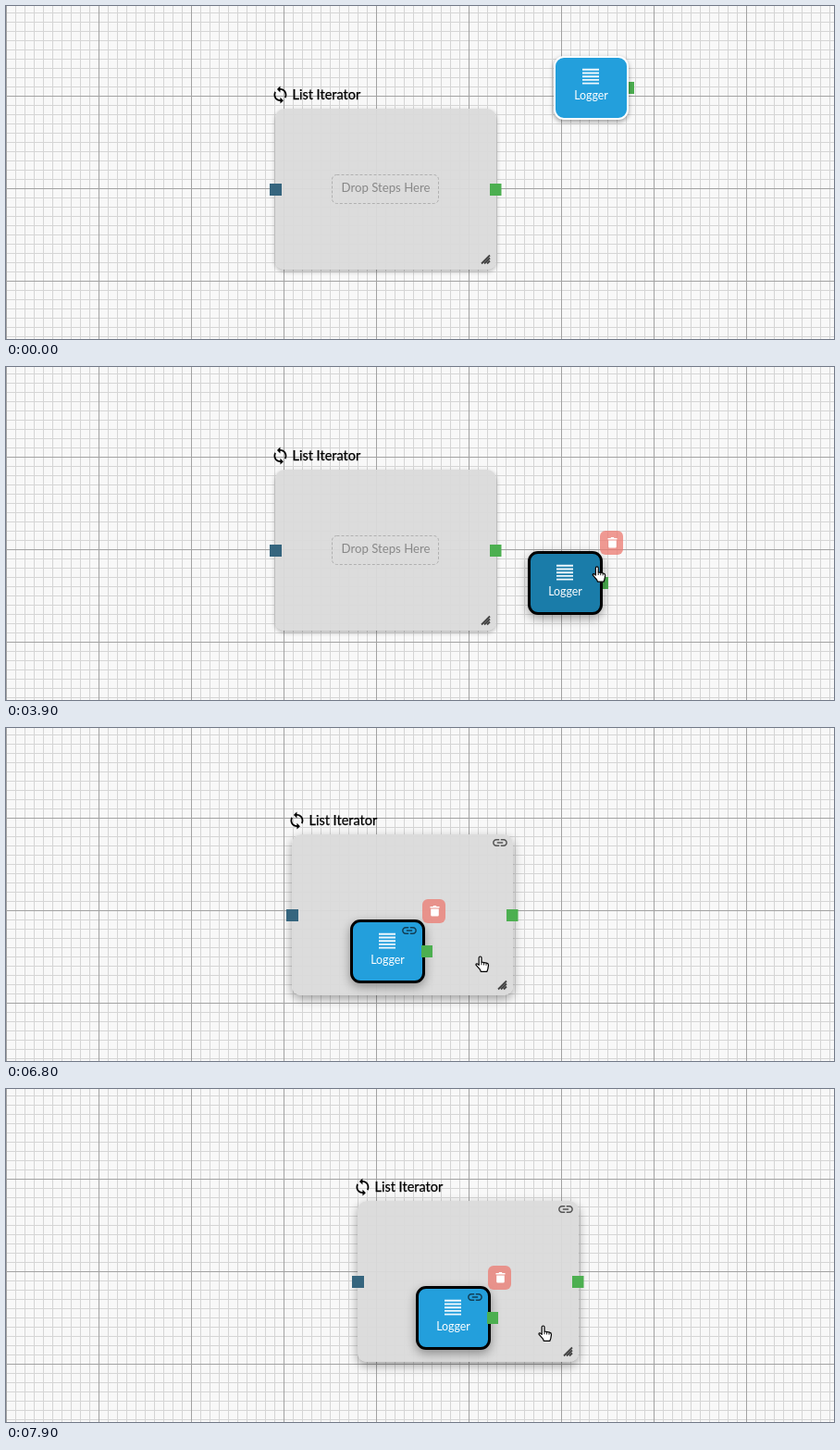
Animation of 895x360 px, one loop 8 s. Source, as an HTML page:

```html
<!DOCTYPE html>
<html lang="en">
<head>
<meta charset="utf-8">
<title>Drag a step into a list iterator</title>
<style>
html, body { margin: 0; width: 100%; height: 100%; overflow: hidden; }
body {
  position: relative;
  font-family: Lato, "Noto Sans", sans-serif;
  --major: #a2a2a2;
  --minor: #d5d5d5;
  background:
    linear-gradient(90deg, var(--major) 1px, transparent 1px) 0 0 / 100px 100px,
    linear-gradient(var(--major) 1px, transparent 1px) 0 97px / 100px 100px,
    linear-gradient(90deg, var(--minor) 1px, transparent 1px) 0 0 / 10px 10px,
    linear-gradient(var(--minor) 1px, transparent 1px) 0 7px / 10px 10px,
    #f8f8f8;
}
div, svg { position: absolute; box-sizing: border-box; }
svg { left: 0; top: 0; overflow: visible; }
#group, #card { left: 0; top: 0; }

.panel {
  left: 291px; top: 111px; width: 239px; height: 174px;
  border-radius: 10px;
  background: rgba(219, 219, 219, .95);
  box-shadow: 0 2px 5px rgba(0, 0, 0, .28);
}
.docked .panel { box-shadow: 0 4px 11px rgba(0, 0, 0, .36); }
.outline {
  left: 288px; top: 108px; width: 245px; height: 181px;
  border: 3px dashed #35657e; border-radius: 13px;
  visibility: hidden;
}
.over .outline { visibility: visible; }

.tile {
  z-index: 1;
  width: 81px; height: 69px;
  border: 2.5px solid #fff; border-radius: 11px;
  background: #239fdc;
  box-shadow: 0 2px 5px rgba(0, 0, 0, .38);
}
.hover .tile { background: #1a7ca9; }
.picked .tile { border: 3px solid #000; box-shadow: 0 4px 11px rgba(0, 0, 0, .36); }
.face { z-index: 2; }
.picked .face { transform: translateY(1px); }
.port { left: 74.5px; top: 28px; width: 12.5px; height: 12.5px; background: #4caf50; }
.docked .port { left: 76.5px; z-index: 3; }
.bin {
  z-index: 4;
  left: 77.5px; top: -22px; width: 25.5px; height: 26px;
  border-radius: 6px;
  background: rgba(236, 124, 114, .77);
  visibility: hidden;
}
.picked .bin { visibility: visible; }

.link { visibility: hidden; }
.linked .link { visibility: visible; }
.linked .drop { visibility: hidden; }
#cursor g { display: none; }
#cursor.move .cross, #cursor.hand .finger { display: inline; }
</style>
</head>
<body>
<svg width="0" height="0">
  <defs>
    <path id="chain" d="M3.9 12c0-1.71 1.39-3.1 3.1-3.1h4V7H7c-2.76 0-5 2.24-5 5s2.24 5 5 5h4v-1.9H7c-1.71 0-3.1-1.39-3.1-3.1zM8 13h8v-2H8v2zm9-6h-4v1.9h4c1.71 0 3.1 1.39 3.1 3.1s-1.39 3.1-3.1 3.1h-4V17h4c2.76 0 5-2.24 5-5s-2.24-5-5-5z"/>
  </defs>
</svg>

<div id="group">
  <div class="panel"></div>
  <div class="outline"></div>
  <svg width="895" height="360">
    <path transform="translate(286 85.6) scale(.87)" d="M12 4V1L8 5l4 4V6c3.31 0 6 2.69 6 6 0 1.01-.25 1.97-.7 2.8l1.46 1.46C19.54 15.03 20 13.57 20 12c0-4.42-3.58-8-8-8zm0 14c-3.31 0-6-2.69-6-6 0-1.01.25-1.97.7-2.8L5.24 7.74C4.46 8.97 4 10.43 4 12c0 4.42 3.58 8 8 8v3l4-4-4-4v3z"/>
    <text x="309.5" y="101" font-size="14.5" stroke="#000" stroke-width=".25">List Iterator</text>
    <g class="drop">
      <rect x="352.5" y="182.5" width="115" height="31" rx="5" fill="none" stroke="#b0b0b0" stroke-dasharray="3 2"/>
      <text x="410.5" y="201" font-size="13.2" text-anchor="middle" fill="#888">Drop Steps Here</text>
    </g>
    <path d="M514 278.5l9-9M517 278.5l6-6M520 278.5l3-3" stroke="#444" stroke-width="1.8"/>
    <use class="link" href="#chain" transform="translate(506.5 110.5) scale(.79)" fill="#555"/>
    <rect x="285" y="192" width="13" height="13" fill="#35657e"/>
    <rect x="523" y="192" width="12.5" height="13" fill="#4caf50"/>
  </svg>
</div>

<div id="card">
  <div class="port"></div>
  <div class="tile"></div>
  <svg class="face" width="81" height="69">
    <path d="M31 15h18M31 18.7h18M31 22.4h18M31 26.1h18M31 29.8h18" transform="translate(0 -.2)" stroke="#eef8fd" stroke-width="1.9"/>
    <text x="40.5" y="47" font-size="12.4" text-anchor="middle" fill="#fff">Logger</text>
    <use class="link" href="#chain" transform="translate(54.5 1.5) scale(.79)" fill="#123f57"/>
  </svg>
  <div class="bin">
    <svg width="26" height="26">
      <path d="M8.5 8h3l.6-1h2.8l.6 1h3v1.6h-10zM9.2 10.4h8.6v6.8q0 1.3-1.3 1.3h-6q-1.3 0-1.3-1.3z" fill="#fff"/>
    </svg>
  </div>
</div>

<svg id="cursor" width="20" height="20">
  <g class="cross">
    <path d="M0-9.5l3.6 4H1v4.500h4.500v-2.600l4 3.600-4 3.600V1H1v4.500h2.600L0 9.500l-3.600-4H-1V1h-4.500v2.600l-4-3.600 4-3.600V-1H-1v-4.500h-2.600z" stroke="#fff" stroke-width="1.4" paint-order="stroke"/>
  </g>
  <g class="finger" transform="translate(-5 -1)">
    <path d="M4.2 2.4a1.4 1.4 0 0 1 2.8 0V7l5.6 1.2q2 .5 1.9 2.4l-.6 3.600-1 3.200H6.400L5.400 15.200 1.200 10.400q-.6-1.300.7-1.600 1-.1 2.300 1.500z" fill="#fff" stroke="#000" stroke-width="1.2" stroke-linejoin="round"/>
    <path d="M7 7v3.200M9.500 7.700v2.700M12 8.200v2.500" stroke="#000" stroke-width=".9"/>
  </g>
</svg>

<script>
const LOOP = 8000, STEP = 100;
const HOME = [592, 54];

// Waypoints: [step, x, y]
const cardPath = [
  [35, ...HOME], [36, 600, 62], [37, 603, 85], [38, 597, 141], [39, 564, 199],
  [40, 530, 222], [41, 494, 231], [42, 455, 231], [43, 422, 227], [44, 404, 220],
  [45, 377, 210], [46, 360, 205], [47, 354, 203]
];
const approach = [[5, 773.5, 140.5], [6, 752, 132], [7, 702, 112], [8, 662, 97], [9, 653, 94]];
const retreat = [
  [55, 415, 243], [56, 423, 242], [57, 462, 246], [58, 508, 249], [59, 525, 249],
  [61, 525, 249], [62, 514, 247], [63, 503, 245], [64, 498, 244]
];
const pull = [[67, 0, 0], [68, 18, 4], [69, 62, 6]];

const $ = id => document.getElementById(id);
const group = $("group"), card = $("card"), cursor = $("cursor");
const cos = deg => Math.cos(deg * Math.PI / 180);
const sin = deg => Math.sin(deg * Math.PI / 180);
const add = (a, b) => [a[0] + b[0], a[1] + b[1]];
const mix = (a, b, k) => a.map((v, i) => v + (b[i] - v) * k);

function along(path, s) {
  const i = path.findIndex(p => p[0] >= s);
  if (i < 0) return path[path.length - 1].slice(1);
  if (i === 0) return path[0].slice(1);
  const [a, b] = [path[i - 1], path[i]];
  return mix(a.slice(1), b.slice(1), (s - a[0]) / (b[0] - a[0]));
}

// The container is pulled aside, then swung round an ellipse
function swing(s) {
  if (s < 70) return along(pull, s);
  const k = s - 71;
  return [36 + 64 * cos(20 + 38.2 * k), -9.5 - 30 * sin(20.5 + 37.4 * k)].map(Math.round);
}

// While dragging, the pointer trails slightly behind
function pointer(s) {
  if (s < 36) return along(approach, s);
  if (s < 55) return add(mix(along(cardPath, s), along(cardPath, s - 1), .4), [61, 40]);
  if (s < 68) return along(retreat, s);
  return add(mix(swing(s), swing(s - 1), .2), [498, 244]).map(Math.round);
}

const place = (el, [x, y]) => { el.style.transform = `translate(${x}px, ${y}px)`; };

function draw(s) {
  const shift = swing(s);
  place(group, shift);
  place(card, add(along(cardPath, s), shift));
  place(cursor, pointer(s));
  const state = {
    hover: s >= 8 && s < 56,
    picked: s >= 28,
    over: s >= 42 && s < 52,
    docked: s >= 52,
    linked: s >= 54
  };
  for (const el of [group, card])
    for (const name in state) el.classList.toggle(name, state[name]);
  cursor.setAttribute("class", s < 4 ? "" : s < 8 ? "move" : "hand");
}

function tick() {
  draw(Math.floor(performance.now() % LOOP / STEP));
  requestAnimationFrame(tick);
}
tick();
</script>
</body>
</html>
```
